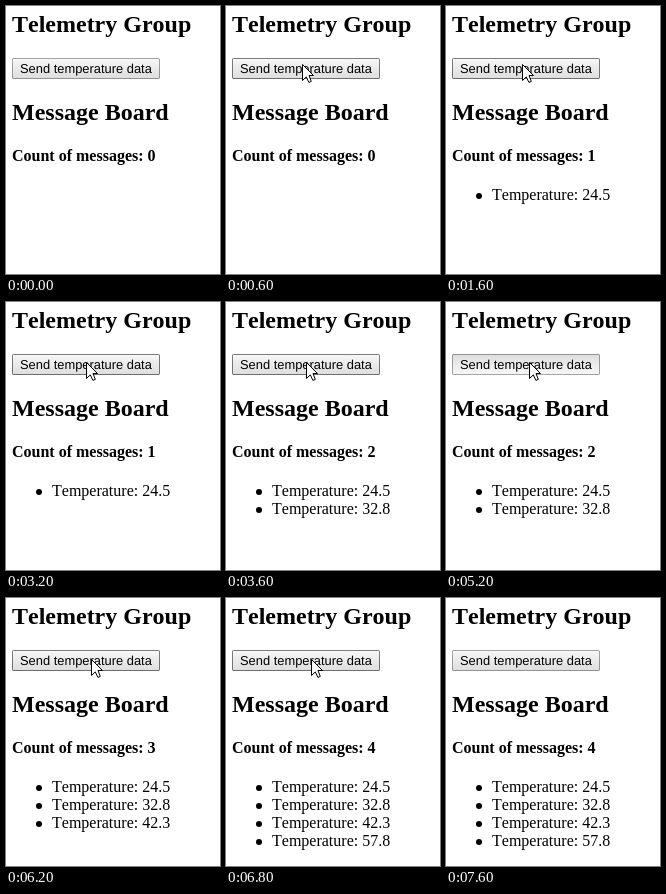
These frames come from a looping animation (214 by 268 pixels, 9600 ms). An HTML page:

```html
<!DOCTYPE html>
<html lang="en">
<head>
<meta charset="utf-8">
<title>Telemetry Group</title>
<style>
html, body { margin: 0; width: 100%; height: 100%; overflow: hidden; background: #fff; }
svg { display: block; }
text { font: 16px "Liberation Serif", "Times New Roman", serif; font-kerning: none; white-space: pre; }
.title { font-size: 24px; font-weight: bold; }
.bold { font-weight: bold; }
.label { font: 12.9px "Liberation Sans", Arial, sans-serif; font-kerning: none; text-rendering: geometricPrecision; }

.pointer, .border, .press, .step { animation: 9.6s step-end infinite; }
.pointer { animation-name: pointer; }
.border { animation-name: border; }
.press { animation-name: press; }
.step { animation-name: step; }
.count { --dy: -18px; }
.cover { --dy: 18px; }

@keyframes pointer {
  0% { transform: translate(118px, 76px); visibility: hidden; }
  2.083% { transform: translate(118px, 76px); visibility: visible; }
  4.166% { transform: translate(82px, 61px); visibility: visible; }
  6.25% { transform: translate(76px, 58px); visibility: visible; }
  33.333% { transform: translate(80px, 60px); visibility: visible; }
  50% { transform: translate(82px, 60px); visibility: visible; }
  52.083% { transform: translate(83px, 60px); visibility: visible; }
  64.583% { transform: translate(85px, 61px); visibility: visible; }
  79.166%, 100% { transform: translate(85px, 61px); visibility: hidden; }
}
/* dark only while hovered and not pressed */
@keyframes border {
  0%, 14.583%, 35.416%, 54.166%, 68.75%, 79.166%, 100% { stroke-opacity: .34; }
  4.166%, 16.666%, 37.5%, 56.25%, 70.833% { stroke-opacity: .5; }
}
@keyframes press {
  0%, 16.666%, 37.5%, 56.25%, 70.833%, 100% { visibility: hidden; }
  14.583%, 35.416%, 54.166%, 68.75% { visibility: visible; }
}
/* one step per message received */
@keyframes step {
  0% { transform: translateY(0); }
  16.666% { transform: translateY(var(--dy)); }
  37.5% { transform: translateY(calc(var(--dy) * 2)); }
  56.25% { transform: translateY(calc(var(--dy) * 3)); }
  70.833%, 100% { transform: translateY(calc(var(--dy) * 4)); }
}
</style>
</head>
<body>
<svg width="214" height="268" viewBox="0 0 214 268">
  <defs>
    <linearGradient id="up" x2="0" y2="1">
      <stop stop-color="#f8f8f8"/><stop offset="1" stop-color="#ddd"/>
    </linearGradient>
    <linearGradient id="down" x2="0" y2="1">
      <stop stop-color="#ddd"/><stop offset="1" stop-color="#f8f8f8"/>
    </linearGradient>
  </defs>

  <text class="title" x="6" y="26">Telemetry Group</text>

  <rect x="6" y="52" width="148" height="21" rx="1" fill="url(#up)"/>
  <rect class="press" x="6" y="52" width="148" height="21" rx="1" fill="url(#down)"/>
  <rect class="border" x="6.5" y="52.5" width="147" height="20" rx="1" fill="none" stroke="#000"/>
  <text class="label" x="14" y="67">Send temperature data</text>

  <text class="title" x="6" y="114">Message Board</text>
  <text class="bold" x="6" y="155">Count of messages:</text>
  <svg x="141" y="140" width="10" height="18" overflow="hidden">
    <g class="step count">
      <text class="bold" x=".5" y="15">0</text>
      <text class="bold" x=".5" y="33">1</text>
      <text class="bold" x=".5" y="51">2</text>
      <text class="bold" x=".5" y="69">3</text>
      <text class="bold" x=".5" y="87">4</text>
    </g>
  </svg>

  <g>
    <text x="46" y="194">Temperature: 24.5</text>
    <text x="46" y="212">Temperature: 32.8</text>
    <text x="46" y="230">Temperature: 42.3</text>
    <text x="46" y="248">Temperature: 57.8</text>
    <circle cx="33" cy="190" r="3"/>
    <circle cx="33" cy="208" r="3"/>
    <circle cx="33" cy="226" r="3"/>
    <circle cx="33" cy="244" r="3"/>
  </g>
  <rect class="step cover" y="181" width="214" height="90" fill="#fff"/>

  <path class="pointer" d="M.5 .5V16.5L4.3 12.9 6.9 18.4 9.3 17.4 7 11.5H11.5Z"
        fill="#fff" stroke="#000" stroke-linejoin="round"/>
</svg>
</body>
</html>
```
